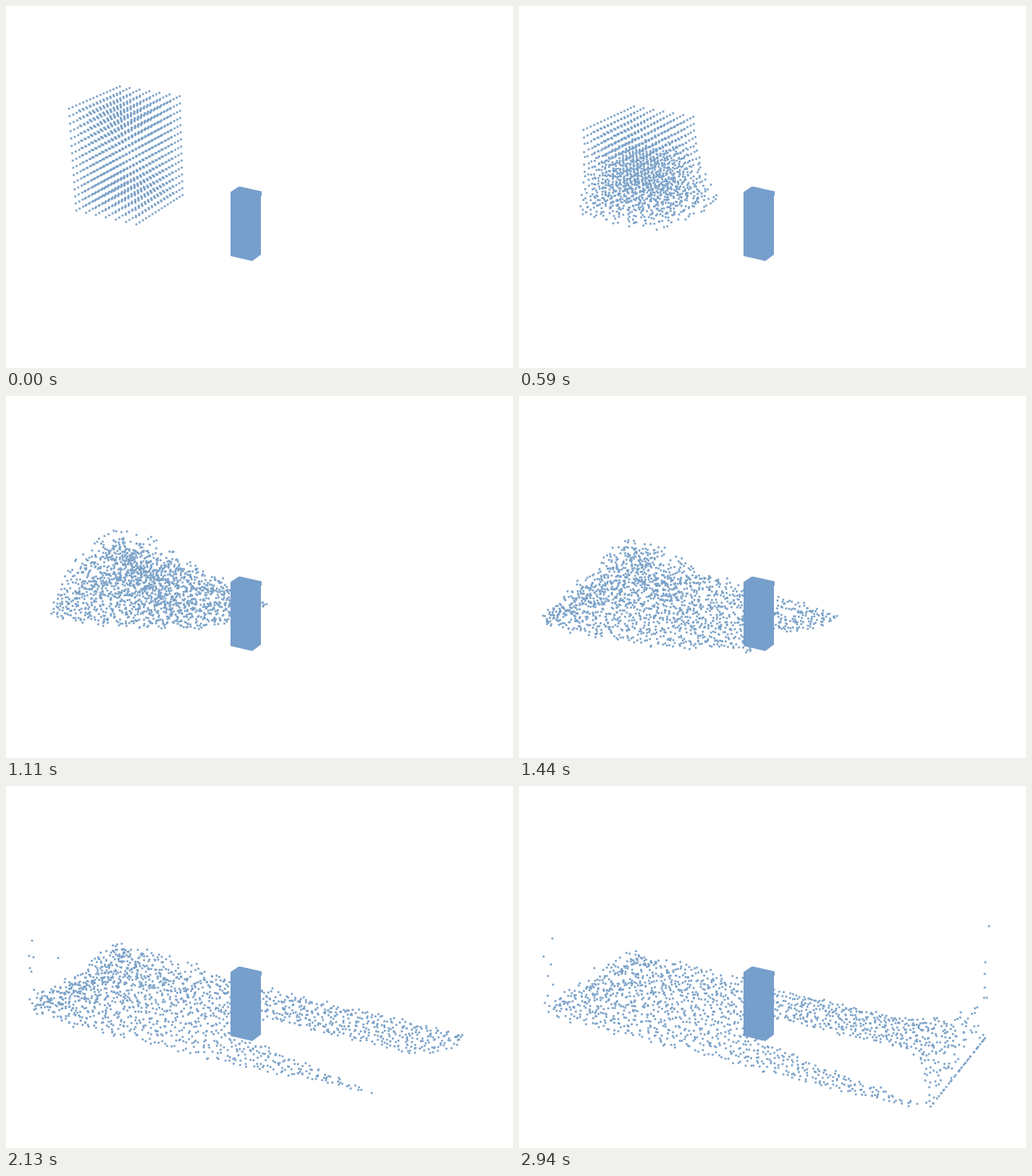
Write an HTML page with a canvas that moves like this. It is 700 by 501 pixels and loops after 3000 ms.

```html
<!DOCTYPE html>
<html lang="en">
<head>
<meta charset="utf-8">
<title>Dam break</title>
<style>
  html, body { margin: 0; width: 100%; height: 100%; overflow: hidden; background: #fff; }
  canvas { display: block; }
</style>
</head>
<body>
<canvas id="stage" width="700" height="501"></canvas>
<script>
const ctx = document.getElementById('stage').getContext('2d');
const LOOP = 3000, STEP = 50, LAST = 59;
const DOT = 2.7;

// Tank floor: a runs along its length, b from front to back, h is height.
const TANK = { length: 36.2, front: -6.8, back: 8 };
const BLOCK = { a: 6.84, b: 8, h: 10.12, nA: 7, nB: 16, nH: 15 };

let seed = 20117;
function rand() {
  seed = (seed + 0x6D2B79F5) | 0;
  let x = Math.imul(seed ^ (seed >>> 15), 1 | seed);
  x = (x + Math.imul(x ^ (x >>> 7), 61 | x)) ^ x;
  return ((x ^ (x >>> 14)) >>> 0) / 4294967296;
}
const mix = (p, q, t) => p + (q - p) * t;
const clamp = (x, lo, hi) => Math.max(lo, Math.min(hi, x));

function project([a, b, h]) {
  const x = -17.34 + 0.8824 * a + 0.4709 * b;
  const y = 2.262 + 0.1765 * a - 0.3307 * b - 0.9272 * h;
  const z = 100 - 0.4364 * a + 0.8178 * b - 0.3747 * h;
  return [350 + 1459 * x / z, 250 + 1459 * y / z];
}

// Steps at which the pose of the water is described
const KEYS = [0, 12, 22, 29, 42, 52, 59];

// Shape of the spreading water for the later keys
const POSES = [
  { ra: 16.4, rb: 12,   round: 2.5, crowd: 1.2,  over: 1,    top: 5.3, fallA: 1.5,  drop: 1,   fallB: 4,   mess: 0.4, curl: 0,    splash: 0,   corner: 0 },
  { ra: 22.4, rb: 14.8, round: 2.5, crowd: 1.6,  over: 1,    top: 4.7, fallA: 0.75, drop: 0.8, fallB: 1.5, mess: 0.8, curl: 0,    splash: 0,   corner: 0.5 },
  { ra: 35.6, rb: 14.8, round: 4,   crowd: 1.6,  over: 1,    top: 3.2, fallA: 0.45, drop: 0.6, fallB: 1,   mess: 1,   curl: 0,    splash: 0,   corner: 2 },
  { ra: 36.2, rb: 14.8, round: 8,   crowd: 1.35, over: 1.02, top: 2.5, fallA: 0.42, drop: 0.4, fallB: 1,   mess: 1,   curl: 0.18, splash: 3,   corner: 1.6 },
  { ra: 36.2, rb: 14.8, round: 20,  crowd: 1.25, over: 1.03, top: 2.2, fallA: 0.4,  drop: 0.4, fallB: 1,   mess: 1,   curl: 0.3,  splash: 4.4, corner: 1.2 }
];

// Opens the dry gap behind the pillar
function partFlow(a, b, curl) {
  if (a < 18.5) return b;
  const lo = Math.max(TANK.front + 0.4, -2 - (a - 19) * 0.25);
  const hi = 2.3 - curl * Math.max(0, a - 30.5) ** 2;
  if (hi <= lo) return b;
  const mid = mix(lo, hi, 0.35);
  return b > mid
    ? TANK.back - (TANK.back - b) * (TANK.back - hi) / (TANK.back - mid)
    : TANK.front + (b - TANK.front) * (lo - TANK.front) / (mid - TANK.front);
}

function spread(pose, along, away, w, r) {
  const x = along ** pose.crowd, y = away ** 1.05;
  const norm = (x ** pose.round + y ** pose.round) ** (1 / pose.round);
  const fit = norm > 0 ? Math.max(x, y) / norm : 0;
  const sa = Math.min(1, x * fit * pose.over), sb = y * fit;
  const a = sa * pose.ra;
  const b = partFlow(a, TANK.back - sb * pose.rb, pose.curl);
  let h = mix(w, r[2], pose.mess) * pose.top * (1 - sa ** pose.fallA) * (1 - pose.drop * sb ** pose.fallB);
  // Water climbing the walls
  if (sa < 1) h += pose.splash * (Math.max(0, a - 27.5) / 8.7) ** 2 * (1 - sb) * r[3];
  h += pose.corner * Math.max(0, sb - 0.75) * 4 * Math.max(0, 1 - a / 3) * r[3];
  return [a, b, h];
}

function makeTrack(i, j, k) {
  const r = [rand(), rand(), rand(), rand()];
  const u = i / (BLOCK.nA - 1), v = j / (BLOCK.nB - 1), w = k / (BLOCK.nH - 1);
  const low = 1 - w, flare = low * low;
  const start = [u * BLOCK.a, v * BLOCK.b, w * BLOCK.h];
  const jitter = n => (r[n] - 0.5) * 0.9 * low;
  const sag = [
    start[0] + 2.4 * u * flare * (1 - 0.6 * (1 - v) ** 4) + jitter(0) * u,
    start[1] - 1.4 * (1 - v) * flare * (1 - 0.75 * u ** 4) + jitter(1) * (1 - v),
    start[2] - 2.05 * (1 - flare) + jitter(2) * w
  ];
  const along = (i + (BLOCK.nH - 1 - k + r[0]) / BLOCK.nH) / BLOCK.nA;
  const away = (BLOCK.nB - 1 - j + r[1]) / BLOCK.nB;
  return [start, sag, ...POSES.map(p => spread(p, along, away, w, r))];
}

// Smooth path through the keys, starting at rest
function slope(track, n, c) {
  if (n === 0) return 0;
  const next = Math.min(n + 1, KEYS.length - 1);
  return (track[next][c] - track[n - 1][c]) / (KEYS[next] - KEYS[n - 1]);
}
function poseAt(track, step) {
  let n = 0;
  while (n < KEYS.length - 2 && step >= KEYS[n + 1]) n++;
  const span = KEYS[n + 1] - KEYS[n], t = (step - KEYS[n]) / span;
  const t2 = t * t, t3 = t2 * t;
  return track[n].map((p, c) =>
    p * (2 * t3 - 3 * t2 + 1) + track[n + 1][c] * (3 * t2 - 2 * t3) +
    span * (slope(track, n, c) * (t3 - 2 * t2 + t) + slope(track, n + 1, c) * (t3 - t2)));
}

const water = [];
for (let i = 0; i < BLOCK.nA; i++)
  for (let j = 0; j < BLOCK.nB; j++)
    for (let k = 0; k < BLOCK.nH; k++) water.push(makeTrack(i, j, k));

// Single drops thrown up at the walls, as screen points for the last keys
function makeDrop(from, birth, points) {
  const track = KEYS.slice(0, birth + 1).map(() => from);
  for (let n = 0; n < points.length; n += 2) track.push([points[n], points[n + 1]]);
  return { track, born: KEYS[birth] };
}
const drops = [
  ...[
    [36, 214, 42, 202, 46, 211], [32, 235, 30, 224, 34, 236], [38, 237, 43, 220, 44, 247],
    [33, 252, 40, 234, 40, 263], [35, 257, 35, 247, 47, 275], [72, 238, 89, 235, 104, 252]
  ].map(p => makeDrop([39, 312], 3, p)),
  ...[
    [645, 264, 649, 194], [643, 288, 644, 244], [629, 295, 643, 260],
    [637, 320, 643, 279], [611, 306, 646, 293]
  ].map(p => makeDrop([622, 347], 4, p))
];

const pillar = new Path2D(
  'M310 257.5 L321 250 H324 L353 256.5 V262 L352 263 V344 L340 353 L336 352 L310 346 Z');

function dot([x, y]) {
  ctx.fillRect(x - DOT / 2, y - DOT / 2, DOT, DOT);
}

function draw(step) {
  ctx.fillStyle = '#fff';
  ctx.fillRect(0, 0, 700, 501);
  ctx.fillStyle = '#7ba2c8';
  for (const track of water) {
    const [a, b, h] = poseAt(track, step);
    dot(project([
      clamp(a, 0, TANK.length),
      clamp(b, TANK.front, TANK.back),
      Math.max(0, h)
    ]));
  }
  for (const d of drops) if (step >= d.born) dot(poseAt(d.track, step));
  ctx.fillStyle = '#779fcc';
  ctx.fill(pillar);
}

const begin = performance.now();
let shown = -1;
function tick() {
  const t = (performance.now() - begin) % LOOP;
  const step = Math.min(LAST, Math.floor((t + 10) / STEP));
  if (step !== shown) draw(shown = step);
  requestAnimationFrame(tick);
}
tick();
</script>
</body>
</html>
```
